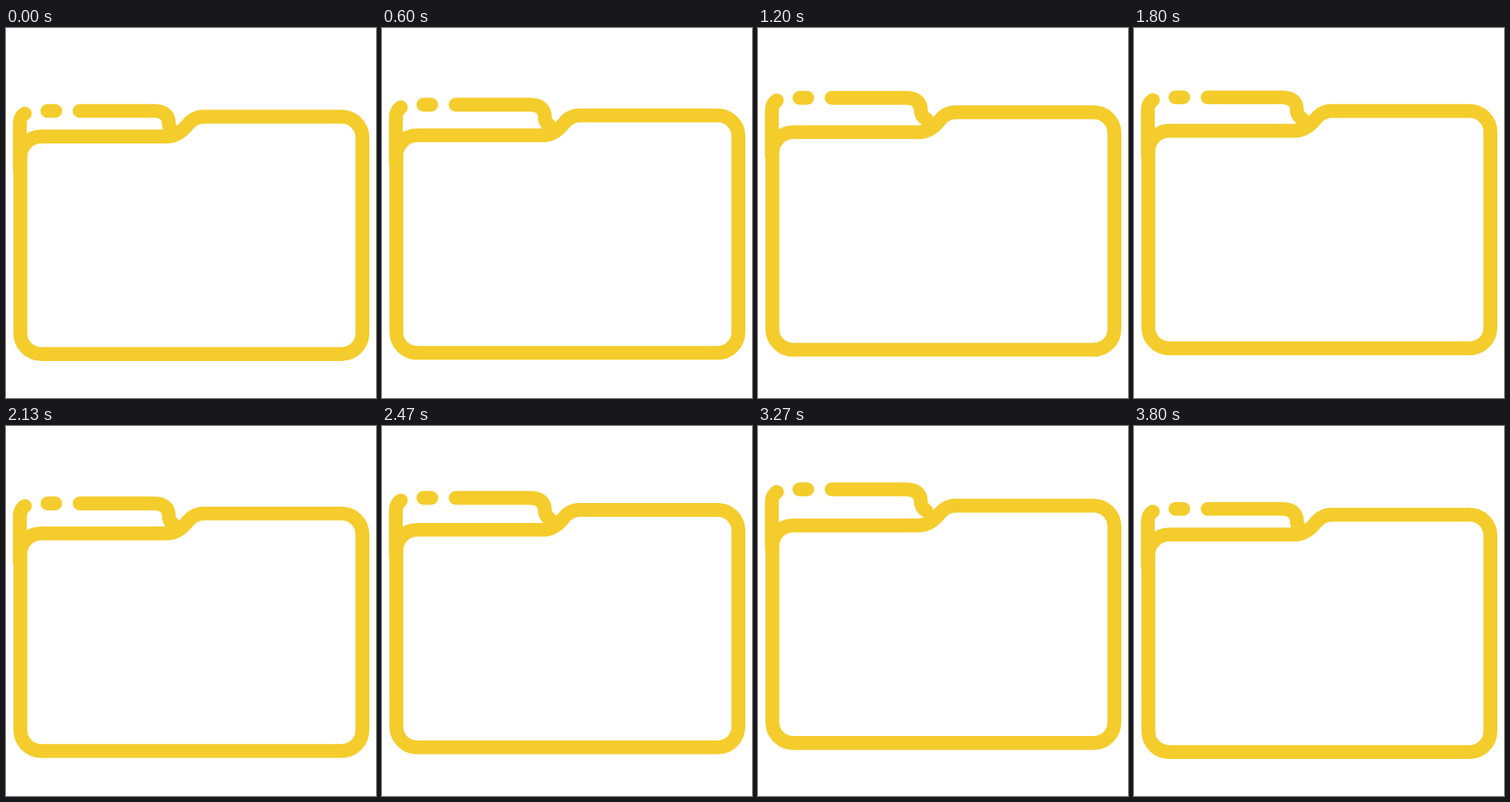
Animation of 500 by 500 pixels, one loop 5.01 s. Source, as an HTML page:

```html
<!DOCTYPE html>
<html lang="en">
<head>
<meta charset="utf-8">
<title>Hopping folder</title>
<style>
  html, body { margin: 0; width: 100%; height: 100%; overflow: hidden; background: #fff; }
  svg { display: block; width: 100%; height: 100%; }
  path { fill: none; stroke: #f4cc2c; stroke-width: 18.7; }
</style>
</head>
<body>
<svg viewBox="0 0 500 500">
  <g id="tab">
    <path d="M18.7 193V129Q18.7 120 25.5 115.5"/>
    <path d="M25.5 115.5h0M56 112H66.5M99.5 112H200C213 112 220 118 220 128C220 134 223 138.5 228 141.5" stroke-linecap="round"/>
  </g>
  <path id="front" d="M217 146.6H47.5A28 28 0 0 0 19.4 175V412.5A28 28 0 0 0 47.5 440.6H453.5A28 28 0 0 0 481.6 412.5V148A28 28 0 0 0 453.5 119.8H267C257 119.8 251 124 246 130C239 139 229 146.6 217 146.6Z"/>
</svg>
<script>
  const LOOP = 5010;
  const HOP = 680;
  const LANDED = 3785;
  const HEIGHTS = [20, 24.5, 20, 16, 26.5];
  const LAST = HEIGHTS.length - 1;
  const FRONT_SHARE = 0.46;

  const tab = document.getElementById('tab');
  const front = document.getElementById('front');
  const lift = (el, y) => el.setAttribute('transform', `translate(0 ${-y})`);

  // Equal parabolic hops; the last one floats until the folder lands.
  function draw(t) {
    const i = Math.min(Math.floor(t / HOP), LAST);
    const start = i * HOP;
    const duration = i < LAST ? HOP : LANDED - start;
    const phase = Math.min((t - start) / duration, 1);
    const rise = 4 * phase * (1 - phase);
    lift(tab, HEIGHTS[i] * rise);
    lift(front, HEIGHTS[i] * FRONT_SHARE * rise ** 2);
  }

  let begin;
  function tick(now) {
    begin ??= now;
    draw((now - begin) % LOOP);
    requestAnimationFrame(tick);
  }
  requestAnimationFrame(tick);
</script>
</body>
</html>
```
